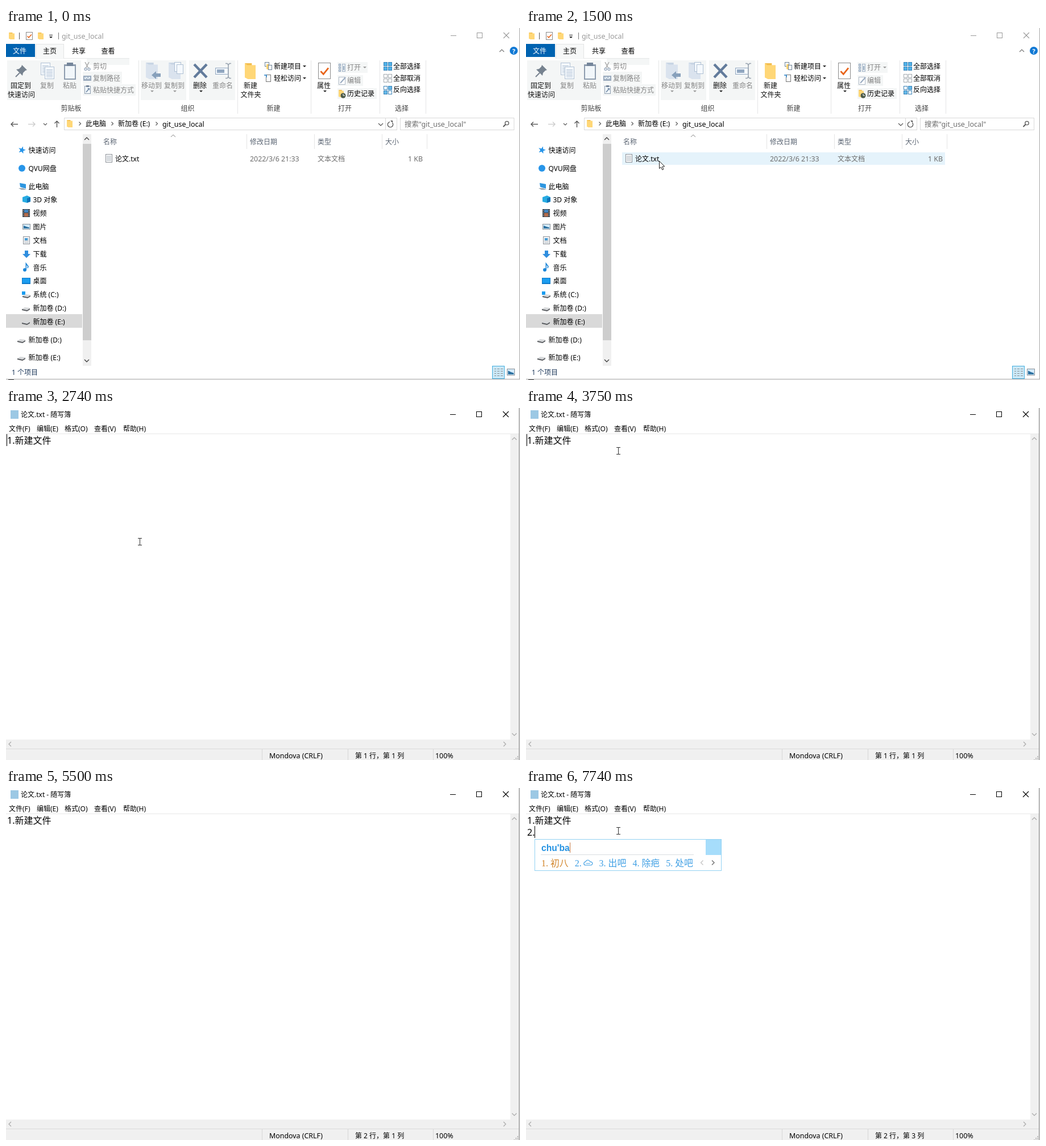
Animation of 904 by 620 pixels, one loop 8000 ms. Source, as an HTML page with a canvas:

```html
<!DOCTYPE html>
<html lang="zh-CN">
<head>
<meta charset="utf-8">
<title>论文.txt</title>
<style>
html, body { margin: 0; width: 100%; height: 100%; overflow: hidden; background: #fff; }
canvas { display: block; }
</style>
</head>
<body>
<canvas id="stage" width="904" height="620"></canvas>
<script>
const g = document.getElementById('stage').getContext('2d');
const UI = '"Noto Sans", "Noto Sans CJK SC", "Noto Sans CJK", sans-serif';
const LATIN = 12.4, LOOP = 8000;

// Drawing helpers
function rect(x, y, w, h, c) { g.fillStyle = c; g.fillRect(x, y, w, h); }
function box(x, y, w, h, stroke, fill) {
  if (fill) rect(x, y, w, h, fill);
  g.strokeStyle = stroke; g.lineWidth = 1;
  g.strokeRect(x + .5, y + .5, w - 1, h - 1);
}
function trace(p) {
  g.beginPath();
  for (let i = 0; i < p.length; i += 2) g.lineTo(p[i], p[i + 1]);
}
function line(c, w, ...p) { trace(p); g.strokeStyle = c; g.lineWidth = w; g.stroke(); }
function poly(c, ...p) { trace(p); g.closePath(); g.fillStyle = c; g.fill(); }
function disc(x, y, r, c) { g.beginPath(); g.arc(x, y, r, 0, 7); g.fillStyle = c; g.fill(); }
function ring(x, y, r, c, w = 1, a = 0, b = 6.3) {
  g.beginPath(); g.arc(x, y, r, a, b); g.strokeStyle = c; g.lineWidth = w; g.stroke();
}
function text(s, x, mid, c = '#000', size = 12, align = 'left', font = UI, style = '') {
  g.font = `${style} ${size}px ${font}`;
  g.textAlign = align; g.fillStyle = c;
  g.fillText(s, x, Math.round(mid + size * .37));
}
function drop(x, y, c = '#222') { poly(c, x - 3, y, x + 3, y, x, y + 3); }
function chevron(x, y, dx, dy, c, w = 1.2, r = 4) {
  const k = r / 2;
  line(c, w, x - dx * k - dy * r, y - dy * k - dx * r, x + dx * k, y + dy * k,
    x - dx * k + dy * r, y - dy * k + dx * r);
}
function folder(x, y, w, h, c = '#ffd777', back = '#f3bd4e') {
  poly(back, x, y, x + w * .65, y, x + w * .65, y + h * .85, x, y + h * .85);
  poly(c, x + w * .25, y + h * .12, x + w, y + h * .12, x + w, y + h, x + w * .25, y + h);
  poly(c, x, y, x + w * .3, y + h * .15, x + w * .3, y + h, x, y + h * .9);
}
function sheet(x, y, w, h, c = '#8a8f96') {
  box(x, y, w, h, c, '#fff');
  for (let i = y + 3.5; i < y + h - 2; i += 2) line('#b4bcc4', 1, x + 2, i, x + w - 2, i);
}
function checkSheet(x, y, w, h) {
  box(x, y, w, h, '#8a8a8a', '#fff');
  line('#e8641b', w / 8, x + w * .2, y + h * .52, x + w * .42, y + h * .7, x + w * .82, y + h * .32);
}
function picture(x, y, w, h) {
  box(x, y, w, h, '#8a9299', '#d3eafa');
  poly('#2a6f9f', x + 2, y + h - 2, x + 2, y + h * .3, x + w * .5, y + h * .5, x + w - 2, y + h * .65, x + w - 2, y + h - 2);
}
function controls(x, y, c) {
  line(c, 1, x, y + .5, x + 10, y + .5);
  g.strokeStyle = c; g.strokeRect(x + 46.5, y - 4.5, 9, 9);
  line(c, 1.1, x + 93, y - 5, x + 103, y + 5);
  line(c, 1.1, x + 103, y - 5, x + 93, y + 5);
}

// File manager
function titleBar(on) {
  const c = on ? '#000' : '#999';
  folder(5, 8, 10, 12);
  rect(23, 8, 1, 12, '#555');
  checkSheet(35, 7, 12, 14);
  folder(56, 8, 10, 12);
  rect(76, 12, 6, 1, '#222'); drop(79, 15);
  rect(92, 8, 1, 12, '#777');
  text('git_use_local', 98, 14, c, LATIN);
  controls(782, 13, c);
  rect(0, 28, 51, 23, '#0063b1');
  text('文件', 24, 40.5, '#fff', 12, 'center');
  box(52, 28, 50, 26, '#e3e4e5', '#f7f8f8');
  rect(53, 53, 48, 2, '#f7f8f8');
  text('主页', 65, 40.5); text('共享', 116, 40.5); text('查看', 167.5, 40.5);
  rect(102, 53, 115, 1, '#e6e7e8');
  chevron(872, 40, 0, -1, '#777');
  disc(893, 40, 7, '#0f78d4');
  text('?', 893, 40.5, '#fff', 11, 'center', UI, 'bold');
}

function ribbonBack() {
  const pad = '#f4f6f6';
  [[2, 57, 130, 70], [142, 54, 75, 11], [135, 77, 69, 21], [135, 99, 93, 20], [237, 57, 80, 70],
    [322, 57, 81, 70], [583, 60, 53, 19], [583, 83, 45, 19], [583, 106, 69, 19]]
    .forEach(b => rect(...b, pad));
  [233, 407, 536, 657, 738].forEach(x => rect(x, 57, 1, 94, '#e4e5e6'));
  [['剪贴板', 114.5], ['组织', 319.5], ['新建', 470.5], ['打开', 596], ['选择', 696]]
    .forEach(([s, x]) => text(s, x, 141.5, '#444', 12, 'center'));
}

function clipboardGroup(on) {
  const off = '#858585', live = on ? '#111' : off, ink = on ? '#5b8fc2' : '#b3c3d5';
  const pin = on ? '#a4afbb' : '#76828f', pinText = on ? off : '#111';
  poly(pin, 28, 65, 37, 74, 34, 75, 30, 79, 29, 84, 18, 73, 23, 72, 27, 68);
  line(pin, 2, 24, 79, 17, 86);
  text('固定到', 26, 102, pinText, 12, 'center');
  text('快速访问', 27, 118, pinText, 12, 'center');
  for (const d of [0, 7]) {
    box(61 + d, 61 + d, 17, 22, ink, '#f5f9fd');
    for (let i = 0; i < 6; i++) line(ink, 1, 64 + d, 66.5 + d + i * 2.5, 75 + d, 66.5 + d + i * 2.5);
  }
  text('复制', 72, 102, live, 12, 'center');
  rect(102, 64, 21, 27, '#8d9cae'); rect(104, 67, 17, 22, '#f1f6fa'); rect(107, 61, 11, 6, '#74859a');
  text('粘贴', 112, 102, off, 12, 'center');
  const steel = on ? '#3d7ab4' : '#9aaabd';
  line(on ? '#555' : '#999', 1.2, 139, 60, 145, 71); line(on ? '#555' : '#999', 1.2, 146, 60, 140, 71);
  ring(140, 72.5, 2, steel, 1.3); ring(146, 72.5, 2, steel, 1.3);
  text('剪切', 153, 68, live);
  rect(136, 84, 14, 9, steel); rect(138, 86, 10, 4, '#e8f1f8');
  line(steel, 1, 139, 86, 142, 90, 144, 86, 147, 90);
  text('复制路径', 153, 88.5, live);
  box(138, 102, 11, 14, '#8d9cae', '#f1f6fa'); rect(141, 101, 5, 3, '#74859a');
  line('#7088a4', 1.5, 141, 113, 145, 108); poly('#7088a4', 143, 106, 147, 106, 147, 110);
  text('粘贴快捷方式', 153, 109.5, off);
}

function organizeGroup(on) {
  const live = on ? '#111' : '#858585', mark = on ? '#222' : '#999';
  const arrow = on ? '#2b8fe0' : '#87a0bb', ink = on ? '#5b8fc2' : '#b0c1d4';
  const tone = on ? ['#ffd777', '#f3bd4e'] : ['#dae3ee', '#c8d5e4'];
  folder(246, 61, 21, 29, ...tone);
  poly(arrow, 256, 83, 264, 76, 264, 80, 272, 80, 272, 86, 264, 86, 264, 90);
  text('移动到', 256, 102, live, 12, 'center'); drop(257, 110, mark);
  folder(286, 61, 21, 29, ...tone);
  for (const d of [0, 4]) box(296 + d, 60 + d, 12, 17, ink, '#f5f9fd');
  text('复制到', 296, 102, live, 12, 'center'); drop(297, 110, mark);
  const x = on ? '#c54a1c' : '#627b9b';
  line(x, 4.5, 331, 64, 353, 87); line(x, 4.5, 353, 64, 331, 87);
  text('删除', 341, 102, '#111', 12, 'center'); drop(343, 110);
  const bar = on ? '#2787d2' : '#91a7c0', edge = on ? '#555' : '#9aa5b1';
  box(368, 70, 23, 12, bar, '#f5f9fd'); rect(371, 73, 13, 6, bar);
  line(edge, 1.6, 391, 64, 391, 87);
  line(edge, 1.6, 386, 62.5, 389, 62.5, 391, 65, 393, 62.5, 396, 62.5);
  line(edge, 1.6, 386, 88.5, 389, 88.5, 391, 86, 393, 88.5, 396, 88.5);
  text('重命名', 381, 102, live, 12, 'center');
}

function createGroups(on) {
  const live = on ? '#111' : '#858585';
  folder(420, 62, 19, 28);
  text('新建', 430, 102, '#111', 12, 'center'); text('文件夹', 430.5, 118, '#111', 12, 'center');
  box(455, 60, 8, 8, '#6d8296', '#fff'); folder(458, 64, 6, 9); box(461, 65, 7, 9, '#6d8296', '#fff');
  text('新建项目', 471, 68); drop(525, 66);
  box(457, 82, 9, 13, '#777', '#fff'); line('#2e86cc', 1.5, 454, 83, 458, 83, 458, 87);
  text('轻松访问', 471, 88.5); drop(525, 87);
  checkSheet(549, 61, 22, 29);
  text('属性', 559, 102, '#111', 12, 'center'); drop(561, 110);
  if (on) {
    poly('#dcebf6', 587, 63, 597, 63, 594, 73, 584, 73);
    poly('#3c78ad', 584, 73, 588, 68, 598, 66, 595, 75, 586, 77);
  } else {
    for (let i = 0; i < 3; i++) box(585, 63 + i * 5, 4, 4, '#8ba0b8', '#dbe4ee');
    box(591, 63, 6, 14, '#a5b5c7', '#e8eef4'); line('#7890aa', 1.5, 594, 67, 594, 74);
  }
  text('打开', 600, 70, live); drop(631, 68, on ? '#222' : '#999');
  box(585, 86, 12, 14, on ? '#7d8891' : '#afbac7', '#fff');
  line(on ? '#df7b2c' : '#9aabc0', 2, 588, 97, 597, 87);
  text('编辑', 600, 93, live);
  folder(585, 109, 9, 13); disc(593, 119, 4.5, '#4b5a4a'); line('#fff', 1, 593, 116, 593, 119, 596, 119);
  text('历史记录', 600, 116);
  const shades = [['#50b3ea', '#50b3ea'], ['#fff', '#fff'], ['#fff', '#66b9e9']];
  ['全部选择', '全部取消', '反向选择'].forEach((s, i) => {
    const y = [60, 81, 102][i];
    for (let k = 0; k < 4; k++) {
      const col = k % 2, row = k >> 1;
      box(664 + col * 8, y + row * 8, 7, 7, i == 1 ? '#a3aab0' : '#3a83b7', shades[i][(col + row) % 2]);
    }
    text(s, 681, [68, 88.5, 109][i]);
  });
}

function addressBar() {
  const c = '#555';
  line(c, 1.4, 21, 169.5, 9, 169.5); chevron(11, 169.5, -1, 0, c, 1.4);
  line('#ccc', 1.4, 39, 169.5, 51, 169.5); chevron(49, 169.5, 1, 0, '#ccc', 1.4);
  chevron(69, 169.5, 0, 1, c, 1.1, 3);
  line(c, 1.4, 89.5, 175, 89.5, 165); chevron(89.5, 166, 0, -1, c, 1.4);
  box(102, 158, 586, 22, '#d9d9d9'); rect(667, 159, 1, 20, '#d9d9d9');
  folder(107, 162, 10, 13);
  [130, 187, 265].forEach(x => chevron(x, 168.5, 1, 0, '#555', 1.1, 3));
  text('此电脑', 140, 169); text('新加卷 (E:)', 197, 169); text('git_use_local', 275, 169, '#000', LATIN);
  chevron(659, 170, 0, 1, c);
  ring(676, 170, 4.7, c, 1.3, -.7, 4.5); poly(c, 676, 163, 680, 163, 680, 167);
  box(693, 158, 201, 22, '#d9d9d9');
  text('搜索"git_use_local"', 701, 169, '#6b6b6b', LATIN);
  ring(881, 167.5, 3.2, c, 1.3); line(c, 1.8, 878.5, 170, 874.5, 174);
}

function disk(y, x) {
  poly('#d6d8da', x, y + 2, x + 5, y - 1, x + 14, y, x + 14, y + 1, x + 9, y + 4);
  poly('#56595d', x, y + 2, x + 9, y + 4, x + 14, y + 1, x + 14, y + 3, x + 9, y + 6, x, y + 4);
}
const icons = {
  star(y) {
    const p = [];
    for (let i = 0; i < 10; i++) {
      const a = i * Math.PI / 5 - 1.3, r = i % 2 ? 2.8 : 6.8;
      p.push(28 + r * Math.cos(a), y + r * Math.sin(a));
    }
    poly('#2795e9', ...p);
  },
  cloud(y) { disc(28, y, 6, '#2795e9'); },
  pc(y) {
    poly('#2e96e0', 24, y - 6, 35, y - 4, 35, y + 4, 25, y + 1);
    poly('#9ea8b1', 22, y + 3, 30, y + 3, 36, y + 6, 27, y + 6);
  },
  cube(y) {
    poly('#27abe2', 29, y - 4, 37, y - 7, 43, y - 4, 37, y + 6, 29, y + 4);
    poly('#0f74b8', 37, y - 2, 43, y - 4, 43, y + 4, 37, y + 6);
  },
  film(y) {
    rect(29, y - 7, 13, 14, '#39434d'); rect(32, y - 6, 7, 5, '#4287c4'); rect(32, y, 7, 6, '#b46c4c');
    for (let i = -5; i < 7; i += 3) { rect(30, y + i, 1, 1, '#fff'); rect(40, y + i, 1, 1, '#fff'); }
  },
  image(y) { picture(29, y - 5, 14, 10); },
  doc(y) { sheet(30, y - 7, 12, 14); rect(33, y - 4, 5, 4, '#4a9fd8'); },
  down(y) {
    poly('#2f8ede', 33, y - 6, 39, y - 6, 39, y, 43, y, 36, y + 7, 29, y, 33, y);
  },
  note(y) { disc(33, y + 4, 3, '#1c86d8'); line('#1c86d8', 1.6, 35.3, y + 4, 35.3, y - 7, 39, y - 2, 38, y + 1); },
  desk(y) { rect(28, y - 5, 15, 11, '#0f79c9'); rect(29, y - 4, 13, 8, '#1b9df0'); },
  sys(y) { rect(28, y - 5, 6, 6, '#1b9df0'); disk(y + 1, 29); },
  disk(y) { disk(y, 28); },
  outer(y) { disk(y, 20); }
};
const places = [
  ['star', '快速访问', 215, 39], ['cloud', 'QVU网盘', 247, 39], ['pc', '此电脑', 279, 39],
  ['cube', '3D 对象', 302], ['film', '视频', 326], ['image', '图片', 350], ['doc', '文档', 374],
  ['down', '下载', 397.5], ['note', '音乐', 421.5], ['desk', '桌面', 445], ['sys', '系统 (C:)', 469],
  ['disk', '新加卷 (D:)', 493], ['disk', '新加卷 (E:)', 517],
  ['outer', '新加卷 (D:)', 548.5, 39], ['outer', '新加卷 (E:)', 580, 39]
];
function sidebar() {
  rect(0, 504, 134, 24, '#d9d9d9');
  for (const [icon, s, y, x = 47] of places) {
    icons[icon](Math.round(y));
    text(s, x + .5, y + .6);
  }
  rect(135, 187, 15, 408, '#f0f0f0');
  rect(135, 204, 15, 346, '#cdcdcd');
  chevron(142, 195, 0, -1, '#444', 1.4); chevron(142, 586, 0, 1, '#444', 1.4);
}

function fileList(hover, on) {
  [423, 542, 661, 740].forEach(x => rect(x, 187, 1, 26, '#e5e5e5'));
  chevron(294, 190, 0, -1, '#888', 1);
  [['名称', 171], ['修改日期', 429], ['类型', 548], ['大小', 667]]
    .forEach(([s, x]) => text(s, x, 200.5, '#5a6472'));
  if (on) box(169, 219, 568, 22, '#9bd0ee', '#cce8f6');
  else if (hover) rect(169, 219, 568, 22, '#e5f3fb');
  sheet(175, 222, 12, 15);
  text('论文.txt', 192, 230.5);
  text('2022/3/6 21:33', 429, 230.5, '#6d6d6d', LATIN);
  text('文本文档', 548, 230.5, '#6d6d6d');
  text('1 KB', 733, 230.5, '#6d6d6d', LATIN, 'right');
}

function explorer(t) {
  const on = t >= 2500;
  titleBar(on);
  ribbonBack(); clipboardGroup(on); organizeGroup(on); createGroups(on);
  addressBar();
  sidebar();
  fileList(t >= 1500, on);
  text('1 个项目', 10, 606.5, '#1e395b');
  if (on) { text('选中 1 个项目', 75.5, 606.5, '#1e395b'); text('10 字节', 155, 606.5, '#1e395b'); }
  box(855, 595, 22, 23, '#45afe0', '#cbe8f6');
  for (let y = 600.5; y < 614; y += 4) {
    line('#8b8f93', 1, 859, y, 862, y);
    line('#8b8f93', 1, 864, y, 868, y);
    line('#8b8f93', 1, 870, y, 874, y);
  }
  picture(881, 600, 14, 12);
  rect(903, 0, 1, 619, on ? '#c8c8c8' : '#a5a5a5');
  rect(0, 618, 904, 1, on ? '#8a8a8a' : '#a5a5a5');
  rect(4, 619, 10, 1, '#555');
}

// Text editor
function editor(t) {
  rect(8, 4, 14, 15, '#9cc8e4');
  text('论文.txt - 随写簿', 26, 12);
  controls(781, 11, '#000');
  [['文件(F)', 5], ['编辑(E)', 54], ['格式(O)', 103], ['查看(V)', 155], ['帮助(H)', 206]]
    .forEach(([s, x]) => text(s, x, 36.5));
  rect(0, 45, 902, 1, '#e8e8e8');
  text('1.新建文件', 2, 57.5, '#000', 16);
  const typed = t < 5990 ? '' : t < 6500 ? '2' : '2.';
  text(typed, 2, 78.5, '#000', 16);

  const bar = '#f0f0f0';
  rect(887, 46, 15, 554, bar); rect(0, 584, 902, 36, bar);
  chevron(894, 54, 0, -1, '#aaa'); chevron(894, 575, 0, 1, '#aaa');
  chevron(7, 592, -1, 0, '#aaa'); chevron(877, 592, 1, 0, '#aaa');
  rect(0, 600, 902, 1, '#dadada');
  [450, 601, 751].forEach(x => rect(x, 601, 1, 19, '#d7d7d7'));
  const row = t < 5000 ? 1 : 2;
  const col = row == 2 ? typed.length + 1 : t < 4000 ? 1 : 7;
  text('Mondova (CRLF)', 463, 612.5, '#000', LATIN);
  text(`第 ${row} 行，第 ${col} 列`, 614, 612.5);
  text('100%', 755, 612.5, '#000', LATIN);
  for (let i = 0; i < 3; i++)
    for (let k = 0; k <= i; k++) rect(899 - k * 3, 613 + i * 3, 2, 2, '#bbb');
  rect(902, 0, 1, 620, '#8a8a8a'); rect(903, 0, 1, 620, '#e4e4e4');

  const hidden = [[3250, 3750], [4750, 5000], [5500, 5990], [6990, 7500]].some(([a, b]) => t >= a && t < b);
  const caretX = col == 7 ? 78 : [1, 11, 15][col - 1];
  if (!hidden) rect(caretX, row == 1 ? 46 : 67, 1, 21, '#000');
}

function cloudIcon(x, y) {
  g.beginPath();
  g.arc(x + 4, y + 1, 3, 1.57, 4.4);
  g.arc(x + 8, y - 1, 4, 3.5, 6);
  g.arc(x + 13, y + 1, 3, 5, 7.85);
  g.closePath();
  g.strokeStyle = '#3f9fe4'; g.lineWidth = 1.2; g.stroke();
  line('#3f9fe4', 1, x + 5, y + 1, x + 12, y + 1);
}

function inputPanel(pinyin, words) {
  const widths = words.map(w => 26.8 + 16 * (w.length || 1));
  const end = 27 + widths.reduce((a, b) => a + b, 0), right = Math.round(end + 39.4);
  box(15, 90, right - 15, 56, '#93d2f3', '#fff');
  rect(right - 28, 91, 27, 27, '#a6ddfb');
  rect(26, 117, right - 75, 1, '#d9dde0');
  text(pinyin, 27, 105, '#2492e2', 15.6, 'left', '"Liberation Sans", Arial, sans-serif', 'bold');
  rect(Math.round(27 + g.measureText(pinyin).width), 96, 1, 18, '#c47a45');
  let x = 27;
  words.forEach((w, i) => {
    const c = i ? '#3f9fe4' : '#d18327';
    text(i + 1 + '.', x, 132, c, 16, 'left', '"Liberation Serif", serif');
    if (w) text(w, x + 16, 132, c, 15.8, 'left', '"Noto Sans CJK SC", "Noto Sans CJK", sans-serif', '300');
    else cloudIcon(x + 15, 132);
    x += widths[i];
  });
  chevron(end + 4.5, 131.5, -1, 0, '#c3c3c3', 1.3);
  chevron(end + 24, 131.5, 1, 0, '#777', 1.5);
}

// Pointers
function arrow(x, y) {
  const p = [0, 0, 0, 13, 3, 10.5, 5.2, 15.3, 7.4, 14.3, 5.3, 9.6, 9.3, 9.3]
    .map((v, i) => v + (i % 2 ? y : x) + .5);
  poly('#fff', ...p);
  line('#222', 1, ...p, p[0], p[1]);
}
function beam(x, y) {
  const c = '#333';
  rect(x, y - 6, 1, 13, c);
  for (const dy of [-6, 6]) { rect(x - 3, y + dy, 3, 1, c); rect(x + 1, y + dy, 3, 1, c); }
}
function clickGlow(x, y) { disc(x, y, 12, 'rgba(255,205,110,.75)'); }

const path = [[760, 407, 427], [1000, 310, 330], [1240, 261, 264], [1500, 234, 234],
  [2740, 235, 235], [3500, 224, 190], [3750, 162, 75]];

function draw(t) {
  rect(0, 0, 904, 620, '#fff');
  const spot = path.filter(p => p[0] <= t).pop();
  if (t < 2740) {
    explorer(t);
    if (t >= 2500) clickGlow(233.5, 235);
    if (spot) arrow(spot[1], spot[2]);
    return;
  }
  editor(t);
  if (t >= 7740) inputPanel("chu'ba", ['初八', '', '出吧', '除疤', '处吧']);
  else if (t >= 7500) inputPanel('chu', ['出', '处', '除', '初', '楚']);
  if (t >= 4000 && t < 4240) clickGlow(161, 75);
  if (t < 5000 || t >= 7500) beam(spot[1], spot[2]);
}

const start = performance.now();
function tick() {
  draw((performance.now() - start) % LOOP);
  requestAnimationFrame(tick);
}
tick();
</script>
</body>
</html>
```
